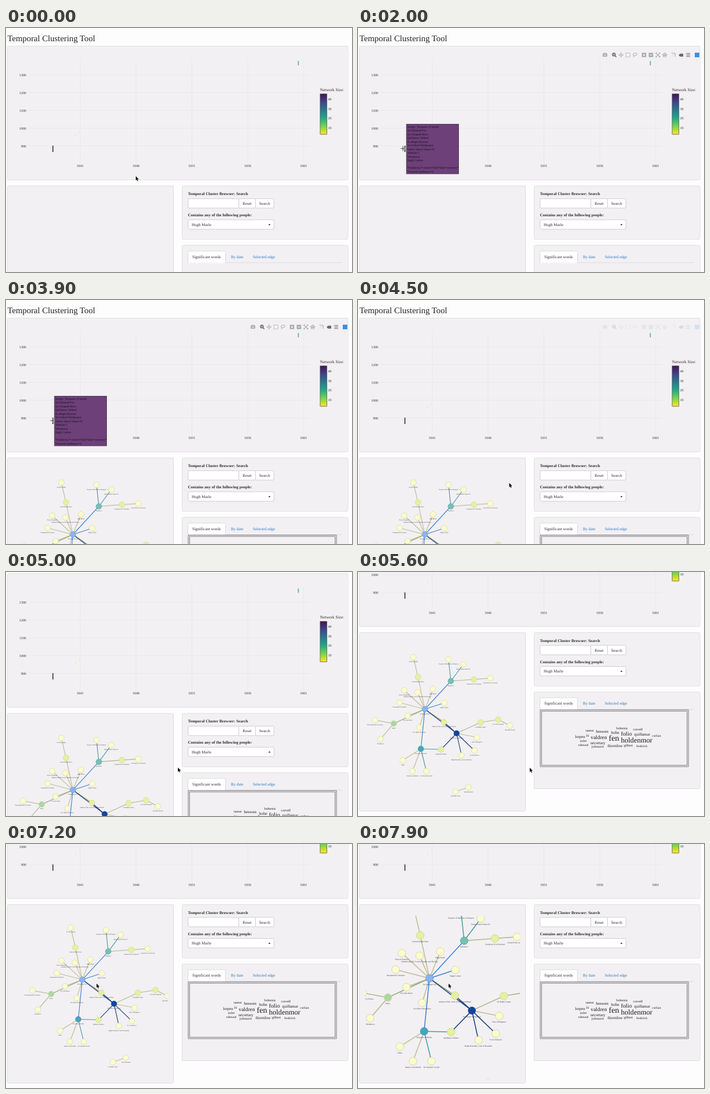
These frames come from a looping animation (600x425 px, 8 s). An HTML page with a canvas:

```html
<!DOCTYPE html>
<html lang="en">
<head>
<meta charset="utf-8">
<title>Temporal Clustering Tool</title>
<style>
html, body { margin: 0; width: 100%; height: 100%; overflow: hidden; background: #fefdfe; }
canvas { display: block; width: 600px; height: 425px; }
</style>
</head>
<body>
<canvas id="stage" width="600" height="425"></canvas>
<script>
const ctx = document.getElementById('stage').getContext('2d');
const LOOP = 8000;
const PAGE = '#fefdfe', PANEL = '#f2f0f3', EDGE = '#e0dee1', INK = '#2b2b2b', LINK = '#2a75bb';

// Keyframes are [time, value, value, ...], joined linearly.
const SCROLL = [[4600, 0], [4700, 6], [4800, 12], [5000, 28.5], [5400, 150], [5600, 169.5]];
const POINTER = [[700, 225, 258], [1000, 226, 222], [1500, 122, 198], [1800, 78, 210],
  [2450, 78, 210], [2500, 81, 210], [4000, 81, 210], [4600, 298, 340], [5600, 298, 341],
  [6300, 152, 244], [6550, 152, 244], [6800, 181, 238], [7150, 157, 243]];
const TOOLBAR = [[700, 0], [1000, 1], [2700, 1], [3000, 0], [3400, 0], [3700, 1], [4250, 1], [4550, 0]];
const VIEW = [[6550, 116, 408.5, 1], [6800, 144.5, 403, 1], [7150, 132.3, 405.8, 1],
  [7420, 132.3, 405.8, 1], [7900, 124, 403.5, 1.336]];

function at(keys, t) {
  const i = keys.findIndex(k => k[0] > t);
  if (i === 0) return keys[0].slice(1);
  if (i < 0) return keys[keys.length - 1].slice(1);
  const a = keys[i - 1], b = keys[i], f = (t - a[0]) / (b[0] - a[0]);
  return a.slice(1).map((v, n) => v + (b[n + 1] - v) * f);
}

function text(str, x, y, size, color = INK, align = 'left', weight = '') {
  ctx.font = `${weight} ${size}px "Liberation Serif", "Times New Roman", serif`;
  ctx.textAlign = align;
  ctx.fillStyle = color;
  ctx.fillText(str, x, y);
}

function box(x, y, w, h, fill, stroke, radius = 0, width = 1) {
  ctx.beginPath();
  ctx.roundRect(x, y, w, h, radius);
  if (fill) { ctx.fillStyle = fill; ctx.fill(); }
  if (stroke) { ctx.strokeStyle = stroke; ctx.lineWidth = width; ctx.stroke(); }
}

function line(color, width, ...pts) {
  ctx.beginPath();
  for (let i = 0; i < pts.length; i += 2) ctx.lineTo(pts[i], pts[i + 1]);
  ctx.strokeStyle = color;
  ctx.lineWidth = width;
  ctx.stroke();
}

function drawPlot() {
  box(2.5, 31.5, 590.5, 233, PANEL, EDGE, 2);
  box(580, 41, 15, 214, PANEL);
  for (let i = 0; i < 5; i++) {
    const x = 128.5 + 96.9 * i, y = 81.5 + 31 * i;
    line('#e9e7ea', 1, x, 55, x, 235);
    line('#e9e7ea', 1, 39, y, 529, y);
    text(1641 + 5 * i, x, 242, 6, INK, 'center');
    text(1300 - 100 * i, 35, y + 2, 6, INK, 'right');
  }
  box(120.5, 185, 1, 3, '#f3e978');
  box(125.5, 180.5, 1, 3, '#f3ecaa');
  box(80.3, 205, 2.1, 11, '#59565b');
  box(506, 57.5, 1.8, 7.5, '#52bfa4');

  text('Network Size:', 544.5, 110, 7.2);
  const ramp = ctx.createLinearGradient(0, 115, 0, 185);
  ['#40164f', '#414487', '#2a788e', '#22a884', '#7ad151', '#fde725']
    .forEach((c, i) => ramp.addColorStop(i / 5, c));
  box(544.8, 114.8, 11.6, 70.4, ramp, '#4a4a4a', 0, .7);
  for (let i = 0; i < 4; i++) text(40 - 10 * i, 558.5, 126.3 + 16.4 * i, 6);
}

function drawToolbar(alpha) {
  if (!alpha) return;
  const grey = '#aaa8ab', dark = '#6b696c';
  ctx.save();
  ctx.globalAlpha = alpha;
  box(424.2, 44.3, 8, 5.8, grey, null, 1);
  box(426.5, 43.3, 3.4, 1.5, grey);
  box(426.6, 45.6, 3.2, 3.2, PANEL, null, 1.6);
  box(427.4, 46.4, 1.6, 1.6, grey, null, .8);
  box(441.2, 43.7, 5, 5, null, dark, 2.5, 1.4);
  line(dark, 1.6, 445.4, 48, 448, 50.8);
  line(dark, .8, 442.3, 46.2, 445.2, 46.2);
  line(dark, .8, 443.7, 44.8, 443.7, 47.6);
  line(grey, 1, 452, 47, 460, 47);
  line(grey, 1, 456, 43, 456, 51);
  for (const [dx, dy] of [[1, 0], [-1, 0], [0, 1], [0, -1]])
    line(grey, 1, 456 + 2.6 * dx - dy, 47 + 2.6 * dy - dx, 456 + 4 * dx, 47 + 4 * dy,
      456 + 2.6 * dx + dy, 47 + 2.6 * dy + dx);
  ctx.setLineDash([1.5, .7]);
  box(464.5, 43.5, 7, 7, null, grey);
  ctx.setLineDash([]);
  ctx.beginPath();
  ctx.ellipse(480.3, 46, 3.6, 2.3, -.2, 0, 7);
  ctx.stroke();
  line(grey, 1, 477.5, 47.5, 478.5, 49, 477.3, 50.7);
  for (const x of [492.2, 504.2]) {
    box(x, 43.2, 7.6, 7.6, grey, null, 1);
    line(PANEL, 1.2, x + 1.7, 47, x + 5.9, 47);
  }
  line(PANEL, 1.2, 496, 44.9, 496, 49.1);
  line(grey, 1.1, 516.3, 43.3, 523.7, 50.7);
  line(grey, 1.1, 523.7, 43.3, 516.3, 50.7);
  for (const x of [516.3, 523.7]) {
    line(grey, .8, x, 45.3, x, 43.2, 520 + (x - 520) * .4, 43.2);
    line(grey, .8, x, 48.7, x, 50.8, 520 + (x - 520) * .4, 50.8);
  }
  line(grey, 1.2, 527.8, 47.4, 532, 43.6, 536.2, 47.4);
  box(529.4, 46.4, 5.2, 4.2, grey);
  box(531.2, 48, 1.6, 2.6, PANEL);
  line(grey, 1, 543.5, 44, 550, 44, 550, 50.5);
  ctx.setLineDash([1, .8]);
  line(grey, .7, 543.8, 50.3, 549.5, 44.5);
  ctx.setLineDash([]);
  const tag = (x, y, h, color) => {
    ctx.beginPath();
    [[0, h / 2], [2.4, 0], [8, 0], [8, h], [2.4, h]].forEach(p => ctx.lineTo(x + p[0], y + p[1]));
    ctx.fillStyle = color;
    ctx.fill();
  };
  tag(556, 44.7, 5, dark);
  tag(568, 43.6, 3, grey);
  tag(568, 47.4, 3, grey);
  box(584, 43, 8, 8, '#3d8fe0');
  ctx.restore();
}

const HOVER = ['People: Treasurer of Works', 'Sir Edmund Fen', 'Sir Osmund Morl', 'Quillamar Valdren',
  'Sir Hugh Hensom', 'Sir Gilbert Holdenmor', 'Sultan Tamor Tamor IV', 'Aldemar I', 'Wendmoor',
  'Hugh Corlian', '', '*holdenmor*valdren*folio*hobe*secretary*', '*hensom*quillamar*iv'];

function drawHover() {
  box(84, 167.5, 90.5, 86.5, '#6d4079', '#4b3852', 0, .9);
  HOVER.forEach((s, i) => text(s, 85.5, 173.6 + 6.5 * i, 5, '#120b15'));
}

function drawControls() {
  box(305.5, 275, 287.5, 93, PANEL, EDGE, 2);
  text('Temporal Cluster Browser: Search', 315.5, 291.2, 7, INK, 'left', 'bold');
  box(315.8, 297.3, 88, 16.4, '#fff', '#cfcdd0', 2);
  box(403.8, 297.3, 28.7, 16.4, '#fff', '#cfcdd0', 1);
  box(432.5, 297.3, 32.2, 16.4, '#fff', '#cfcdd0', 2);
  text('Reset', 418, 308, 7, INK, 'center');
  text('Search', 448.5, 308, 7, INK, 'center');
  text('Contains any of the following people:', 315.5, 328.2, 7, INK, 'left', 'bold');
  box(315.8, 334, 149, 16.4, '#fff', '#cfcdd0', 2);
  text('Hugh Marle', 322, 344.6, 7);
  ctx.beginPath();
  [[454.8, 343.3], [456.8, 341], [458.8, 343.3]].forEach(p => ctx.lineTo(...p));
  ctx.fillStyle = '#222';
  ctx.fill();
}

// Word, left edge, baseline, size
const WORDS = [['tamor', 395, 447.5, 6], ['hensom', 412.5, 449.3, 7], ['bohemia', 448, 443.3, 5.7],
  ['corvell', 477, 445.8, 6], ['hobe', 439, 451.7, 7.2], ['folio', 456, 454.7, 10],
  ['quillamar', 479, 454.5, 7.2], ['corlian', 510, 456, 5.5], ['lorpen', 376.3, 458.7, 6.8],
  ['iv', 395.5, 456.5, 7], ['valdren', 403.5, 460.6, 9.4], ['fen', 434.8, 463, 14.2],
  ['holdenmor', 456, 466.6, 12.6], ['solet', 385, 465, 6], ['secretary', 403, 469.5, 7.2],
  ['edmund', 382, 472.6, 5.4], ['jolimerre', 405, 475.6, 5.8], ['thornlow', 433, 474, 7.2],
  ['gilbert', 461, 473.8, 6], ['frederick', 482.5, 474.6, 5.4]];

function drawWords(ready) {
  box(305.5, 378.5, 287.5, 168.5, PANEL, EDGE, 2);
  line('#dcdadd', 1, 315.5, 408.8, 582.5, 408.8);
  box(315.5, 388.5, 65, 20.5, '#fff', '#dcdadd', [2, 2, 0, 0]);
  line('#fff', 1.4, 316, 409, 380, 409);
  text('Significant words', 323, 400.6, 7);
  text('By date', 390, 400.6, 7, LINK);
  text('Selected edge', 428, 400.6, 7, LINK);
  if (!ready) return;
  box(316, 409.5, 257, 99, PANEL, '#6a686b', 0, .9);
  box(318.3, 411.8, 252.4, 94.4, null, '#6a686b', 0, .9);
  for (const [w, x, y, s] of WORDS) text(w, x, y, s, '#1c1c1c');
}

const PALE = '#fbfbcd', LIME = '#e5f19d';
// x, y, label, fill
const NODES = [
  [116, 239, 'Sir Edmund Fen', '#86b4fa'], [171, 281, 'Sir Gilbert Holdenmor', '#12459b'],
  [161, 190, 'Aldemar I', '#73c2b2'], [109, 308, 'Treasurer of Works', '#3fa9ba'],
  [62, 264, 'Hobe', '#b4dca9'], [104, 183, 'General Ralph Dorn', LIME],
  [149, 261.5, 'Ambrose Telk, Lord of Eastermarchland', LIME], [144, 309, 'Quillamar Valdren', LIME],
  [201, 187, 'Frederick IX of Norland', LIME], [212.5, 262, 'Sir Ralph Lorpen', LIME],
  [243, 257, 'Sir Giles Tarmond', LIME], [96, 148.5, 'Sir Piers Holm'],
  [157, 152.5, 'Keepers of Harbours at Eastport'], [182.5, 161, 'Sultan Tamor Tamor IV'],
  [229.5, 185, 'Count Pieter van Dorrel'], [80, 206, 'Dean of Eastport'],
  [103, 209.5, 'Edmund Harvill, Lord of Wendle and Thorley'], [130, 204, 'Hugh Marle'],
  [72, 227.5, 'Rosamund of Norland'], [149.5, 228, 'Hugh Corlian'], [86, 250.5, 'Sir Giles Bront'],
  [106.5, 271, 'Sir Gilbert Penderlow'], [29.5, 258, 'The Ambassador in France'],
  [39, 291, 'Wendmoor'], [77.5, 328, 'Tolke'], [94.5, 347, 'Hubert Lord Eskell'],
  [118.5, 347, 'Sir Osmund Corvell'], [206.5, 288, 'Piers Tillingmore'],
  [202, 311, 'D. de Jolimerre'], [179.5, 319.5, 'Ralph Brandole, Lord of Brandole'],
  [263.5, 267.5, 'Rowland Ferrick'], [169, 382.5, 'Sir Hubert Lisk'], [191.5, 375, 'Giles Morrend']];
// Edge colour, then pairs of nodes
const EDGES = [
  ['#bfbd8d', '0-15 0-16 0-17 0-18 0-21 3-24 3-25 31-32 5-11 0-5 1-27'],
  ['#adb886', '2-8 8-14 1-9 9-10 10-30 4-22 4-23 0-20'],
  ['#8aa868', '0-4'], ['#8f9a5c', '0-6'],
  ['#3c80dc', '0-2 0-3 0-19'], ['#4b9c9a', '2-12 2-13 3-26 3-7'],
  ['#173f84', '0-1 6-1 7-1 1-28 1-29']];

function drawNetwork(ready, [x, y, k]) {
  box(2.5, 275, 288, 311, PANEL, EDGE, 2);
  if (!ready) return;
  ctx.save();
  ctx.beginPath();
  ctx.rect(12, 294.5, 269, 284.5);
  ctx.clip();
  ctx.translate(x, y);
  ctx.scale(k, k);
  ctx.translate(-116, -239);
  for (const [color, pairs] of EDGES)
    for (const pair of pairs.split(' ')) {
      const [a, b] = pair.split('-').map(i => NODES[i]);
      line(color, 1.15, a[0], a[1], b[0], b[1]);
    }
  NODES.forEach(([nx, ny, label, fill = PALE], i) => {
    box(nx - 5, ny - 5, 10, 10, fill, i < 4 ? 'rgba(50,90,150,.45)' : '#cdd29a', 5, .6);
    if (i === 4) {
      ctx.setLineDash([.8, .8]);
      for (const r of [1.5, 3.4]) box(nx - r, ny - r, 2 * r, 2 * r, null, '#7fb98a', r, .7);
      ctx.setLineDash([]);
    }
  });
  for (const [nx, ny, label] of NODES) text(label, nx, ny + 8.7, 2.6, '#333', 'center');
  ctx.restore();
}

function drawPointer(x, y, cross) {
  if (cross) {
    line('#fff', 1.6, x - 4, y, x + 4, y);
    line('#fff', 1.6, x, y - 4, x, y + 4);
    line('#222', .9, x - 4, y, x + 4, y);
    line('#222', .9, x, y - 4.5, x, y + 4.5);
    return;
  }
  ctx.beginPath();
  [[0, 0], [0, 7.6], [1.7, 6.1], [2.9, 8.8], [4.1, 8.3], [3, 5.7], [5.3, 5.5]]
    .forEach(p => ctx.lineTo(x + p[0], y + p[1]));
  ctx.closePath();
  ctx.strokeStyle = '#fff';
  ctx.lineWidth = 1.2;
  ctx.stroke();
  ctx.fillStyle = '#111';
  ctx.fill();
}

function draw(t) {
  const [scroll] = at(SCROLL, t), [px, py] = at(POINTER, t), ready = t >= 3500;
  ctx.fillStyle = PAGE;
  ctx.fillRect(0, 0, 600, 425);
  ctx.save();
  ctx.translate(0, -scroll);
  text('Temporal Clustering Tool', 2.5, 23.2, 14.8, '#222');
  drawPlot();
  drawToolbar(at(TOOLBAR, t)[0]);
  if ((t >= 1700 && t < 2700) || (t >= 3400 && t < 4050)) drawHover();
  drawNetwork(ready, at(VIEW, t));
  drawControls();
  drawWords(ready);
  ctx.restore();
  drawPointer(px, py, t < 4600 && py < 235);
}

ctx.textRendering = 'geometricPrecision';
const start = performance.now();
function tick() {
  draw((performance.now() - start) % LOOP);
  requestAnimationFrame(tick);
}
tick();
</script>
</body>
</html>
```
